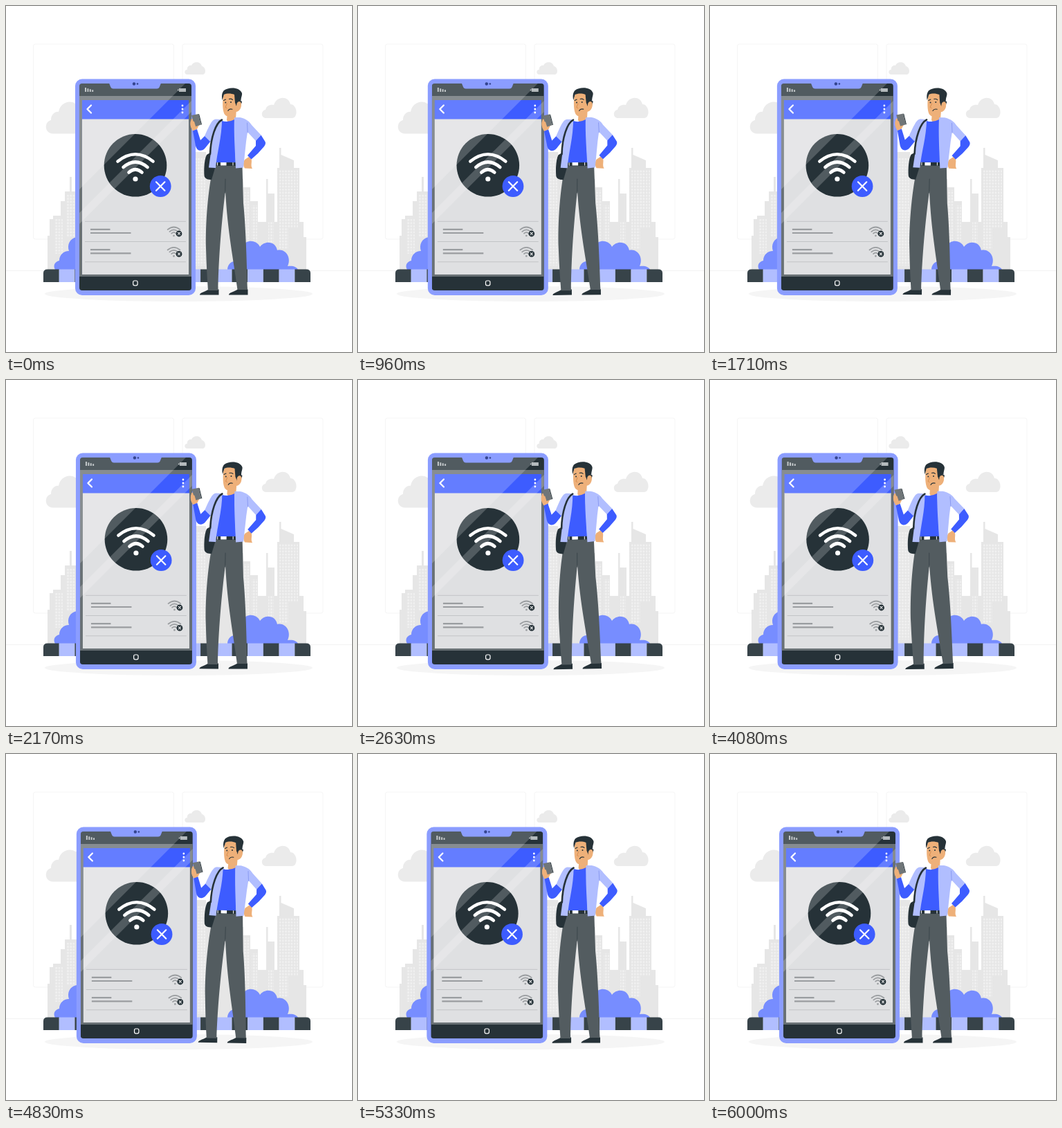
Write an HTML page that moves like this. It is 500 px wide and 500 px high and loops after 6040 ms.

```html
<!DOCTYPE html>
<html lang="en">
<head>
<meta charset="utf-8">
<title>No wireless connection</title>
<style>
html, body { margin: 0; width: 100%; height: 100%; overflow: hidden; background: #fff; }
svg { display: block; width: 100vw; height: 100vh; }
.line { fill: none; stroke-linecap: round; stroke-linejoin: round; }
.dark { fill: #263238; }
.blue { fill: #3d5cff; }
.pale { fill: #b1beff; }
.skin { fill: #eeb079; }
.city { fill: #e6e6e6; }
.bush { fill: #778dff; }
.cloud { fill: #ebebeb; }
</style>
</head>
<body>
<svg viewBox="0 0 500 500">
  <defs>
    <pattern id="panes" width="4.2" height="4.4" patternUnits="userSpaceOnUse">
      <rect width="2.6" height="2.8" fill="#f0f0f0"/>
    </pattern>
    <clipPath id="glass"><rect x="106" y="112" width="162" height="299" rx="4"/></clipPath>
    <clipPath id="curb"><path d="M54 399V386Q54 380.500 60 380.500H434Q440 380.500 440 386V399Z"/></clipPath>
    <g id="arcs" class="line">
      <path d="M-25.500 -25.500Q0 -46 25.500 -25.500M-17.500 -17Q0 -32 17.500 -17M-9.500 -9.500Q0 -18 9.500 -9.500"/>
    </g>
    <g id="row">
      <path d="M122 322.800h28.500M122 328h58.500" stroke="#9a9da0" stroke-width="2.200"/>
      <g transform="translate(242.500 332) scale(.35)">
        <use href="#arcs" stroke="#9a9da0" stroke-width="5"/>
        <circle r="3.800" fill="#9a9da0"/>
      </g>
      <circle class="dark" cx="250" cy="329" r="4.400"/>
      <path class="line" d="M248.500 327.500l3 3m0 -3l-3 3" stroke="#fff" stroke-width="1.100"/>
    </g>
  </defs>

  <g fill="none" stroke="#f5f5f5">
    <rect x="39.500" y="55" width="203" height="282" rx="3"/>
    <rect x="255" y="55" width="203" height="282" rx="3"/>
    <path d="M0 382.500H500" stroke="#ebebeb" stroke-width=".6"/>
  </g>
  <path class="cloud" d="M68 184.500C55 184 55 167 65 165C65 156 72 152 76 153C78 140 92 135 100 141H125V184.500Z"/>
  <path class="cloud" d="M262 99C257 99 257 92 262 92C261 87 266 85 268 86C270 80 281 79 283 87C289 88 290 99 284 99Z"/>
  <path class="cloud" d="M376 162C368 162 368 151 375 150C376 144 382 142 387 143C391 130 408 129 411 142C421 142 423 162 413 162Z"/>

  <path class="city" d="M60 381V332H63V308H68V303H79V282H85V268H92V247H95V268H110V381Z"/>
  <path class="city" d="M262 381V211H289V250H343V262H353V282H364V312H376V250H378.500V271H388V312H392V234H395V205H397.500V215L416 223V234H424V312H430V334H434V381Z"/>
  <g fill="url(#panes)">
    <rect x="70" y="308" width="12" height="50"/>
    <rect x="87" y="272" width="13" height="62"/>
    <rect x="270" y="220" width="18" height="155"/>
    <rect x="344" y="266" width="8" height="75"/>
    <rect x="355" y="288" width="8" height="52"/>
    <rect x="379" y="312" width="8" height="30"/>
    <rect x="395" y="237" width="27" height="84"/>
    <rect x="395" y="321" width="13" height="30"/>
  </g>

  <path class="bush" d="M71 381C67 374 72 369 77 368C77 360 83 354 91 354C88 345 92 336 102 334H115V381Z"/>
  <path class="bush" d="M320 381C320 374 325 369 330 369C328 358 333 348 343 346C348 337 362 338 367 348C374 338 390 340 392 353C404 350 413 364 407 376C415 375 420 377 422 381Z"/>
  <g id="blocks" clip-path="url(#curb)"></g>
  <ellipse cx="249.500" cy="416" rx="193.500" ry="11" fill="#f5f5f5"/>

  <g id="phone">
    <rect x="100" y="105.500" width="174" height="312.500" rx="10" fill="#8b9dff"/>
    <g clip-path="url(#glass)">
      <rect class="dark" x="106" y="112" width="162" height="300"/>
      <rect x="106" y="130" width="162" height="261" fill="#697175"/>
      <rect x="110" y="163" width="154" height="225" fill="#dfe0e2"/>
      <rect class="blue" x="110" y="136" width="154" height="27.500"/>
    </g>
    <path d="M114 118h2v6h-2zM117.400 119.300h2v4.700h-2zM120.800 120.300h2v3.700h-2zM124.200 121.300h2v2.700h-2zM250 119h10v5h-10zM248 120.500h1.500v2H248z" fill="#b4babd"/>
    <path class="line" d="M123 143.500L117.500 149L123 154.500" stroke="#fff" stroke-width="2.300"/>
    <g fill="#fff">
      <circle cx="255" cy="144" r="1.400"/><circle cx="255" cy="149" r="1.400"/><circle cx="255" cy="154" r="1.400"/>
    </g>
    <path d="M114 311.300H260M114 340.500H260M114 369.800H260" stroke="#c2c4c6" stroke-width="1"/>
    <use href="#row"/><use href="#row" y="29.400"/>
    <circle class="dark" cx="187" cy="230.300" r="45.300"/>
    <g clip-path="url(#glass)" fill="#fff">
      <path d="M106 112H259L106 265Z" fill-opacity=".2"/>
      <path d="M268 137L106 299V315L268 153Z" fill-opacity=".2"/>
    </g>
    <path d="M149 111.500L151 116.500Q152 119.500 155 119.500H218Q221 119.500 222 116.500L224 111.500Z" fill="#8b9dff"/>
    <circle cx="185" cy="112.500" r="2.200" fill="#34448f"/><circle cx="190" cy="112.500" r="1.300" fill="#34448f"/>
    <use href="#arcs" transform="translate(187 250)" stroke="#fff" stroke-width="4.600"/>
    <circle cx="187" cy="250" r="3.600" fill="#fff"/>
    <circle class="blue" cx="223.200" cy="260.500" r="15.400"/>
    <path class="line" d="M217 254.300l12.400 12.400m0 -12.400l-12.400 12.400" stroke="#fff" stroke-width="2.200"/>
    <rect x="183.700" y="397" width="6.400" height="6.800" rx="2" fill="none" stroke="#fff" stroke-width="1.200"/>
  </g>

  <g id="man">
    <path class="dark" d="M280 417.500C280 414.500 285 414 293 409.500H307.500V417.500ZM322 417.500C322 414.500 327 414 335 409.500H349.500V417.500Z"/>
    <path d="M300 230C292 262 288 315 289 350Q290 385 292 411H306.500C307 375 310 325 317 267C320 325 329 368 334.500 410H349C348 375 347 325 343 285L341.500 231Z" fill="#535c60"/>
    <path class="line" d="M317 250L316.700 270" stroke="#3b464b" stroke-width="1"/>
    <path class="dark" d="M297 211L290 215C286 223 286 238 286.500 245C287 250 292 251 297 251L303 231Z"/>

    <path class="skin" d="M268 163C266 168 266 174 270 180.500L276 178L279 172L276 163Z"/>
    <path d="M268 158L278 156L282 171.500L273 174.500Z" fill="#707679"/>
    <path d="M278 156L279.200 156.500L283 171.300L282 171.500Z" fill="#263238"/>
    <path class="skin" d="M267 166L272 167L275 177L270 180C266 175 266 170 267 166Z"/>
    <path class="blue" d="M270 180.500L276 178L281 194L289 186L296 195L288 205C283 211 276 210 274 202Z"/>

    <path class="skin" d="M351 218L345 222C342 227 343 231 345 234.500L356 235C353 230 356 226 354.500 221Z"/>
    <path class="blue" d="M361 194L368.500 186.500L374.500 196Q376 199 373 203Q365 213 354.500 221.500L349 216L361 202Z"/>
    <path class="skin" d="M320 153L319 165C321 170 329 168 332 163L333 149Z"/>
    <path class="blue" d="M312 166Q321 169 330 164L332 228H302Z"/>
    <path class="dark" d="M303 226H333V231H302Z"/>
    <path d="M310 226h8.500v4.500h-8.500zM305 226h1v4.500h-1zM327.500 226h1v4.500h-1z" fill="#fff"/>
    <path class="pale" d="M312 164L303 163.500C298 164 295 170 287 188L295 196L299 190L293 233.500L303 234C305 210 312 190 312 164Z"/>
    <path class="pale" d="M330 161L338 161C347 163 352 167 355 172L368.500 186.500L361 195L349 182L347 196L343 233.500L332 234.500C331 210 329 184 330 161Z"/>
    <path class="line" d="M348.500 169L349.200 183" stroke="#8092ee" stroke-width=".8"/>
    <path class="line" d="M312 164.500C303 169 296 190 295 214" stroke="#263238" stroke-width="2.600"/>

    <path class="skin" d="M314 130C312.500 140 313 151 315.500 156C319 162 328 160 332 153C337 153 341 147 339.500 141C338 137 335 138 333.500 140L331 126H317Z"/>
    <path class="dark" d="M312.500 136C311 128 313 124 315 122C322 116.500 338 117 341 126C341.500 129 339.500 132 339.500 137C336 136 334 139 334 146L331 140L330 128C325 126 319 126 315 128Z"/>
    <path class="dark" d="M337 136L341 138C340 144 337 146 334.500 149L332 142Z"/>
    <path class="skin" d="M333.500 141C335 137 340 137 340 142C340 147 336 151 332 151Z"/>
    <g class="line" stroke="#263238" stroke-width="1.100">
      <path d="M314.500 136.500L317.500 135M322.500 134.500Q325 133.500 327.500 135.500M320.800 151.500Q322.500 148 327 149.200"/>
      <path d="M319.300 141L317 146.500L319 147.500" stroke="#d68a4c" stroke-width=".9"/>
    </g>
    <circle class="dark" cx="317.300" cy="139.500" r="1"/><circle class="dark" cx="325" cy="139" r="1"/>
  </g>
</svg>
<script>
const byId = id => document.getElementById(id);
const LOOP = 6040, SHAKE = 6000, SWAY = 1500, BLOCKS = 17;
const shake = [0, -1, 2, -4, 4, -4, 4, -4, 2, -1, 0];
const sway = [0, 1, 0, -1, 0];

for (let i = 0; i < BLOCKS; i++) {
  const w = 386 / BLOCKS;
  byId('blocks').innerHTML +=
    `<rect x="${54 + i * w}" y="380" width="${w + .1}" height="19" fill="${i % 2 ? '#b1beff' : '#374349'}"/>`;
}

// Linear interpolation through evenly spaced keys, p in 0..1
function along(keys, p) {
  const x = p * (keys.length - 1), i = Math.min(Math.floor(x), keys.length - 2);
  return keys[i] + (keys[i + 1] - keys[i]) * (x - i);
}

function draw(now) {
  const t = Math.min(now % LOOP, SHAKE);
  byId('phone').setAttribute('transform', `translate(${along(shake, t / SHAKE)} 0)`);
  byId('man').setAttribute('transform', `rotate(${along(sway, t % SWAY / SWAY)} 320.500 268)`);
  requestAnimationFrame(draw);
}
draw(performance.now());
</script>
</body>
</html>
```
